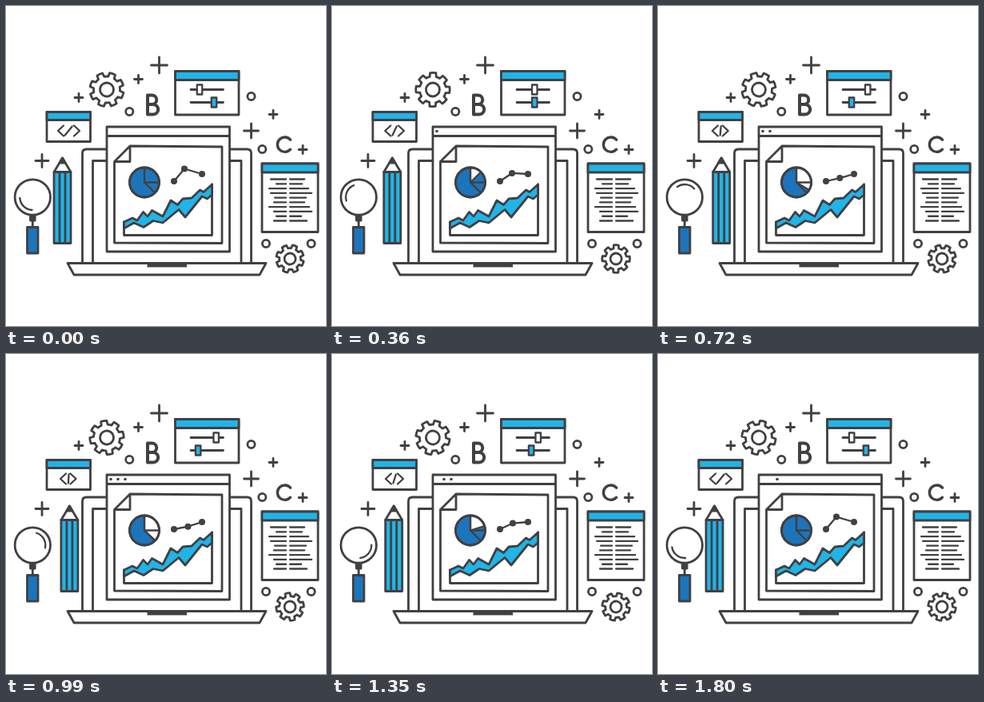
Write an HTML page that moves like this. It is 400 by 400 pixels and loops after 1.83 s.

```html
<!DOCTYPE html>
<html lang="en">
<head>
<meta charset="utf-8">
<title>Analytics workspace</title>
<style>
html, body { margin: 0; width: 100%; height: 100%; overflow: hidden; background: #fff; }
svg { display: block; width: 100vw; height: 100vh; }
.line { fill: none; stroke: #414042; stroke-width: 2.8; stroke-linecap: round; stroke-linejoin: round; }
.white { fill: #fff; }
.sky { fill: #21b4e8; }
.navy { fill: #1c75bc; }
.ink { fill: #414042; }
.thin { stroke-width: 2.3; }
</style>
</head>
<body>
<svg viewBox="0 0 400 400">
  <g class="line">
    <!-- laptop -->
    <path d="M95.5 321V184q0-5 5-5H301.500q5 0 5 5V321M108.500 321V193.500H294V321"/>
    <path class="white" d="M77 321.500H325L317 336H85Z"/>
    <path class="ink" stroke="none" d="M176.500 322.500H226V326.500H176.500Z"/>

    <!-- browser and report -->
    <path class="white" d="M126 151H279.500V307H126ZM126 162.500H279.500"/>
    <g id="dots" class="ink" stroke="none"></g>
    <path class="white" d="M155 175L270 176V296.500L135.500 296V194.500ZM155 175V194.500H135.500"/>
    <path d="M147.500 270V286.500H257.500V223"/>
    <path class="sky" d="M147.500 270L158 265L164 268L171.500 257.500L177 263L182.500 255.500L196 263L206 243L214.500 248.500L221 241L232 240L242.500 230L247 232.500L257.500 223V236L251.500 241L245 238L224 264L216 254.500L196 271L184 268.500L172 276.500L160 271L147.500 278Z"/>
    <circle class="navy" cx="173" cy="220.500" r="18.500"/>
    <path id="slice" class="white thin"/>
    <path class="thin" d="M173 202V220.500H191.500M173 220.500L186 233.500"/>
    <circle cx="173" cy="220.500" r="18.500"/>
    <path id="link" class="thin"/>
    <g class="ink" stroke="none">
      <circle cx="210" cy="219" r="4"/><circle id="node" r="4"/><circle cx="245" cy="210" r="4"/>
    </g>

    <!-- code window -->
    <path class="white" d="M51 132.500H105.500V169.500H51Z"/>
    <path class="sky" d="M51 132.500H105.500V142.500H51Z"/>
    <path id="code" class="thin"/>

    <!-- settings window -->
    <path class="white" d="M211.500 81.500H291V136H211.500Z"/>
    <path class="sky" d="M211.500 81.500H291V92.500H211.500Z"/>
    <path d="M231 104.500H271.500M231 120.500H271.500"/>
    <rect id="knobTop" class="white thin" y="98.500" width="6.500" height="12"/>
    <rect id="knobLow" class="sky thin" y="114.500" width="6.500" height="12"/>

    <!-- text window -->
    <path class="white" d="M320 197H390V282.500H320Z"/>
    <path class="sky" d="M320 197H390V208H320Z"/>
    <path id="rows" class="thin"/>

    <!-- pencil -->
    <g id="pencil">
      <path class="white" d="M-10.500 207.500L0 190L10.500 207.500Z"/>
      <path class="ink" d="M-3.500 196L0 190L3.500 196Z"/>
      <path class="sky" d="M-10.500 207.500H10.500V296.500H-10.500ZM-3.500 207.500V296.500M3.500 207.500V296.500"/>
    </g>

    <!-- magnifier -->
    <circle class="white" cx="33.300" cy="239" r="22.200"/>
    <path id="shine" class="thin" d=""/>
    <path class="ink" d="M30.500 262.500H36.200V268H30.500Z"/>
    <path d="M33.300 268V276"/>
    <path class="navy" d="M26.500 276.500H40V309H26.500Z"/>

    <!-- letters -->
    <path stroke-width="4" style="stroke-width:4" d="M177 111.500H182.500a5.700 5.700 0 0 1 0 11.500H177M182.500 123H184a6.200 6.200 0 0 1 0 12.500H177V111.500"/>
    <path style="stroke-width:3.400" d="M355.500 167.200A9.200 9.200 0 1 0 355.500 179.200"/>

    <path id="pluses"/>
    <g id="rings"></g>
    <g id="gearBig"><path/><circle r="8.500"/></g>
    <g id="gearSmall"><path/><circle r="7"/></g>
  </g>
</svg>
<script>
const LOOP = 1830, STEP = 30;
const $ = id => document.getElementById(id);
const set = (el, attrs) => { for (const k in attrs) el.setAttribute(k, attrs[k]); };
const rad = deg => deg * Math.PI / 180;
const polar = (cx, cy, r, deg) =>
  `${(cx + r * Math.cos(rad(deg))).toFixed(2)} ${(cy + r * Math.sin(rad(deg))).toFixed(2)}`;
const mix = (a, b, p) => a + (b - a) * p;

// Eased 0..1 progress; a bias above 1 brings the middle of the move earlier.
const ease = (u, bias = 1) => (1 - Math.cos(Math.PI * (1 - (1 - u) ** bias))) / 2;

function circles(parent, points, r) {
  parent.innerHTML = points.map(([x, y]) => `<circle cx="${x}" cy="${y}" r="${r}"/>`).join("");
}

function gearPath(outer, inner) {
  let d = "";
  for (let i = 0; i < 8; i++) {
    const a = i * 45;
    d += (i ? "L" : "M") + polar(0, 0, inner, a - 14) +
      "L" + polar(0, 0, outer, a - 10) +
      `A${outer} ${outer} 0 0 1 ` + polar(0, 0, outer, a + 10) +
      "L" + polar(0, 0, inner, a + 14) +
      `A${inner} ${inner} 0 0 1 ` + polar(0, 0, inner, a + 31);
  }
  return d + "Z";
}

function build() {
  circles($("dots"), [[131, 156.5], [140, 156.5], [149, 156.5]], 1.8);
  circles($("rings"), [[154.3, 132], [306.5, 113], [320.3, 179], [325, 297], [381.5, 297]], 4.6);
  $("rings").setAttribute("class", "white");

  const pluses = [[45, 193.5, 8], [91, 114.5, 5], [165.5, 91.5, 5], [191.5, 74, 10],
    [306.5, 156, 9], [334, 135.5, 5], [371, 179.5, 5]];
  $("pluses").setAttribute("d", pluses.map(([x, y, r]) =>
    `M${x - r} ${y}h${2 * r}M${x} ${y - r}v${2 * r}`).join(""));

  const rows = [[331, 373], [338, 370], [329, 378], [331, 382], [336, 375],
    [335, 373], [329, 379], [335, 382], [338, 369], [335, 376]];
  $("rows").setAttribute("d", rows.map(([a, b], i) => {
    const y = 216.5 + i * 5.78;
    return `M${a} ${y}H350M355 ${y}H${b}`;
  }).join(""));

  $("gearBig").firstChild.setAttribute("d", gearPath(21.2, 16.5));
  $("gearSmall").firstChild.setAttribute("d", gearPath(17.3, 13.3));
}

function draw(ms) {
  const u = ms / LOOP, turn = u * 360;
  const half = 1 - Math.abs(1 - 2 * u);
  const soft = ease(half), medium = ease(half, 1.25), quick = ease(half, 1.5);

  set($("gearBig"), { transform: `translate(126 104.5) rotate(${20 + turn})` });
  set($("gearSmall"), { transform: `translate(355 316) rotate(${20 + turn})` });
  set($("shine"), {
    d: `M${polar(33.3, 239, 16, 93 + turn)}A16 16 0 0 1 ${polar(33.3, 239, 16, 177 + turn)}`
  });

  set($("pencil"), { transform: `translate(${mix(70.5, 79.4, quick)} 0)` });
  set($("knobTop"), { x: mix(242, 262.7, quick) - 3.25 });
  set($("knobLow"), { x: mix(260, 239.8, soft) - 3.25 });

  set($("slice"), {
    d: soft < 0.001 ? "" :
      `M173 220.500V202A18.500 18.500 0 0 1 ${polar(173, 220.5, 18.5, 135 * soft - 90)}Z`
  });

  const nx = mix(223, 227.5, medium), ny = mix(203.5, 215.7, medium);
  set($("node"), { cx: nx, cy: ny });
  set($("link"), { d: `M210 219L${nx} ${ny}L245 210` });

  const l = mix(65, 68, medium), r = mix(92, 87.5, medium), s = mix(4.5, 0.3, medium);
  set($("code"), {
    d: `M${l + 7} 149.500L${l} 156L${l + 7} 162.500M${r - 7} 149.500L${r} 156L${r - 7} 162.500` +
      `M${78.2 + s} 150.500L${78.2 - s} 161.500`
  });

  // Three dots switch on one by one, then off in the same order.
  const phase = Math.floor(u * 6);
  [...$("dots").children].forEach((dot, i) =>
    set(dot, { visibility: phase > i && phase < i + 4 ? "visible" : "hidden" }));
}

build();
document.querySelectorAll('[stroke="none"]').forEach(el => { el.style.stroke = "none"; });
const start = performance.now();
function tick() {
  const t = (performance.now() - start) % LOOP;
  draw(Math.floor(t / STEP) * STEP);
  requestAnimationFrame(tick);
}
draw(0);
requestAnimationFrame(tick);
</script>
</body>
</html>
```
